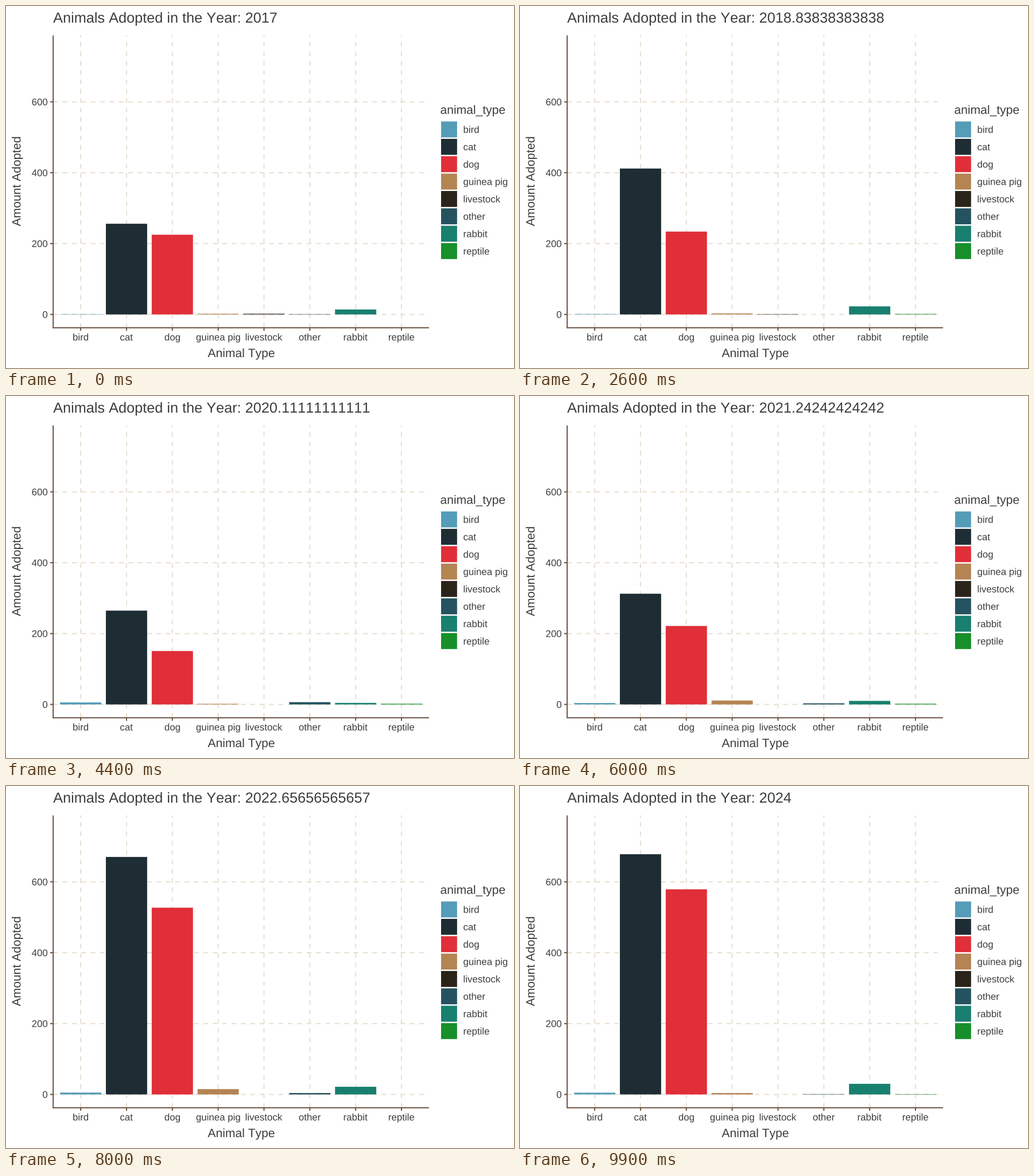
A matplotlib script for the animation above (10 s loop, 885 px wide and 632 px high).

```python
import matplotlib.pyplot as plt
import numpy as np
from matplotlib.animation import FuncAnimation
from matplotlib.patches import PathPatch, Rectangle
from matplotlib.textpath import TextPath
from matplotlib.transforms import Affine2D

W, H, DPI = 885, 632, 100
FRAMES, INTERVAL = 100, 100
FIRST_YEAR, LAST_YEAR = 2017, 2024

# Panel geometry in pixels, y pointing down
LEFT, RIGHT, TOP, BOTTOM = 82.2, 736.9, 51.4, 561.7
STEP = (RIGHT - LEFT) / 8.2
UNIT = (BOTTOM - TOP) / 825
ZERO = BOTTOM - 37.5 * UNIT

# Theme sizes follow a 12 pt base on a 7 inch wide plot
PX = W / 7 / 72
TITLE_PX, LABEL_PX, TICK_PX = 14.4 * PX, 12 * PX, 9.6 * PX
KEY_PX = 17.28 * PX
LINE_PX, TICK_LEN = 2.044, 5.25
TEXT, GRID, AXIS = "#3d3d3d", "#e9dfd1", "#6d5444"

# name: (colour, adoptions per year); 0 means no record that year
ANIMALS = {
    "bird": ("#549cb7", [1, 3, 1, 6, 4, 4, 6, 5]),
    "cat": ("#1d2d33", [256, 243, 440, 266.5, 254, 527, 750, 678]),
    "dog": ("#e02f39", [225, 185.5, 242, 148, 169, 414, 590, 579]),
    "guinea pig": ("#b48453", [2, 2, 3, 1, 7, 26, 9, 4]),
    "livestock": ("#2a231a", [2, 1, 0, 0, 0, 0, 0, 0]),
    "other": ("#25525f", [1, 0, 0, 7, 3, 4, 0, 1]),
    "rabbit": ("#197f6e", [14, 28, 22, 4, 7, 21, 22, 30]),
    "reptile": ("#178f2a", [0, 4, 1, 2, 2, 0, 0, 1]),
}
KEYS = np.round(np.linspace(0, FRAMES - 1, LAST_YEAR - FIRST_YEAR + 1))

# A high kerning factor switches kerning off
plt.rcParams.update({"font.family": "Liberation Sans",
                     "text.kerning_factor": 6})

fig = plt.figure(figsize=(W / DPI, H / DPI), dpi=DPI, facecolor="white")
ax = fig.add_axes([0, 0, 1, 1])
ax.set_xlim(0, W)
ax.set_ylim(H, 0)
ax.axis("off")


def text_path(x, y, s, px, align="left", angle=0):
    """Glyph outlines with their baseline at (x, y)."""
    path = TextPath((0, 0), s, size=px)
    ends = path.get_extents()
    shift = {"left": 0, "center": (ends.x0 + ends.x1) / 2, "right": ends.x1}
    move = Affine2D().translate(-shift[align], 0).scale(1, -1)
    return move.rotate_deg(angle).translate(x, y).transform_path(path)


def label(*args, **kw):
    return ax.add_patch(PathPatch(text_path(*args, **kw), fc=TEXT, ec="none",
                                  lw=0, zorder=4, snap=False))


def line(x0, y0, x1, y1, color, z, dashed=False):
    style = (0, (4, 4)) if dashed else "-"
    ax.plot([x0, x1], [y0, y1], color=color, lw=LINE_PX * 72 / DPI, ls=style,
            dash_capstyle="butt", solid_capstyle="butt", zorder=z, snap=False)


def box(x, y, w, h, color):
    return ax.add_patch(Rectangle((x, y), w, h, fc=color, ec="none", lw=0,
                                  zorder=2, snap=False))


def amount(values, i):
    """Linear between years; bars appear or vanish only as a year is reached."""
    k = np.searchsorted(KEYS, i, side="right") - 1
    a = values[k]
    if i == KEYS[k] or not (a and values[k + 1]):
        return a
    return np.interp(i, KEYS, values)


# Horizontal grid and y axis
for v in (0, 200, 400, 600):
    y = ZERO - v * UNIT
    line(LEFT, y, RIGHT, y, GRID, 1, dashed=True)
    line(LEFT - TICK_LEN, y, LEFT, y, AXIS, 3)
    label(72.1, y + 6, str(v), TICK_PX, "right")

# Vertical grid, x axis, bars and legend
bars = []
for n, (name, (color, values)) in enumerate(ANIMALS.items()):
    x = LEFT + (n + 0.6) * STEP
    line(x, BOTTOM, x, TOP, GRID, 1, dashed=True)
    line(x, BOTTOM, x, BOTTOM + TICK_LEN, AXIS, 3)
    label(x, 583.9, name, TICK_PX, "center")
    bars.append((box(x - 0.45 * STEP, ZERO, 0.9 * STEP, 0, color), values))

    mid = 215.5 + KEY_PX * n
    side = KEY_PX - 2.49
    box(771.9 - side / 2, mid - side / 2, side, side, color)
    label(796.5, mid + 6, name, TICK_PX)

line(LEFT, TOP, LEFT, BOTTOM + LINE_PX / 2, AXIS, 3)
line(LEFT, BOTTOM, RIGHT, BOTTOM, AXIS, 3)

label((LEFT + RIGHT) / 2, 613, "Animal Type", LABEL_PX, "center")
label(25.3, (TOP + BOTTOM) / 2, "Amount Adopted", LABEL_PX, "center", angle=-90)
label(756.5, 188.3, "animal_type", LABEL_PX)
title = label(LEFT, 29, "Animals", TITLE_PX)


def update(i):
    year = FIRST_YEAR + (LAST_YEAR - FIRST_YEAR) * i / (FRAMES - 1)
    heading = f"Animals Adopted in the Year: {year:.15g}"
    title.set_path(text_path(LEFT, 29, heading, TITLE_PX))
    for bar, values in bars:
        bar.set_height(-amount(values, i) * UNIT)
    return [title] + [bar for bar, _ in bars]


anim = FuncAnimation(fig, update, frames=FRAMES, interval=INTERVAL,
                     repeat=True, repeat_delay=0, blit=False)
plt.show()
```
